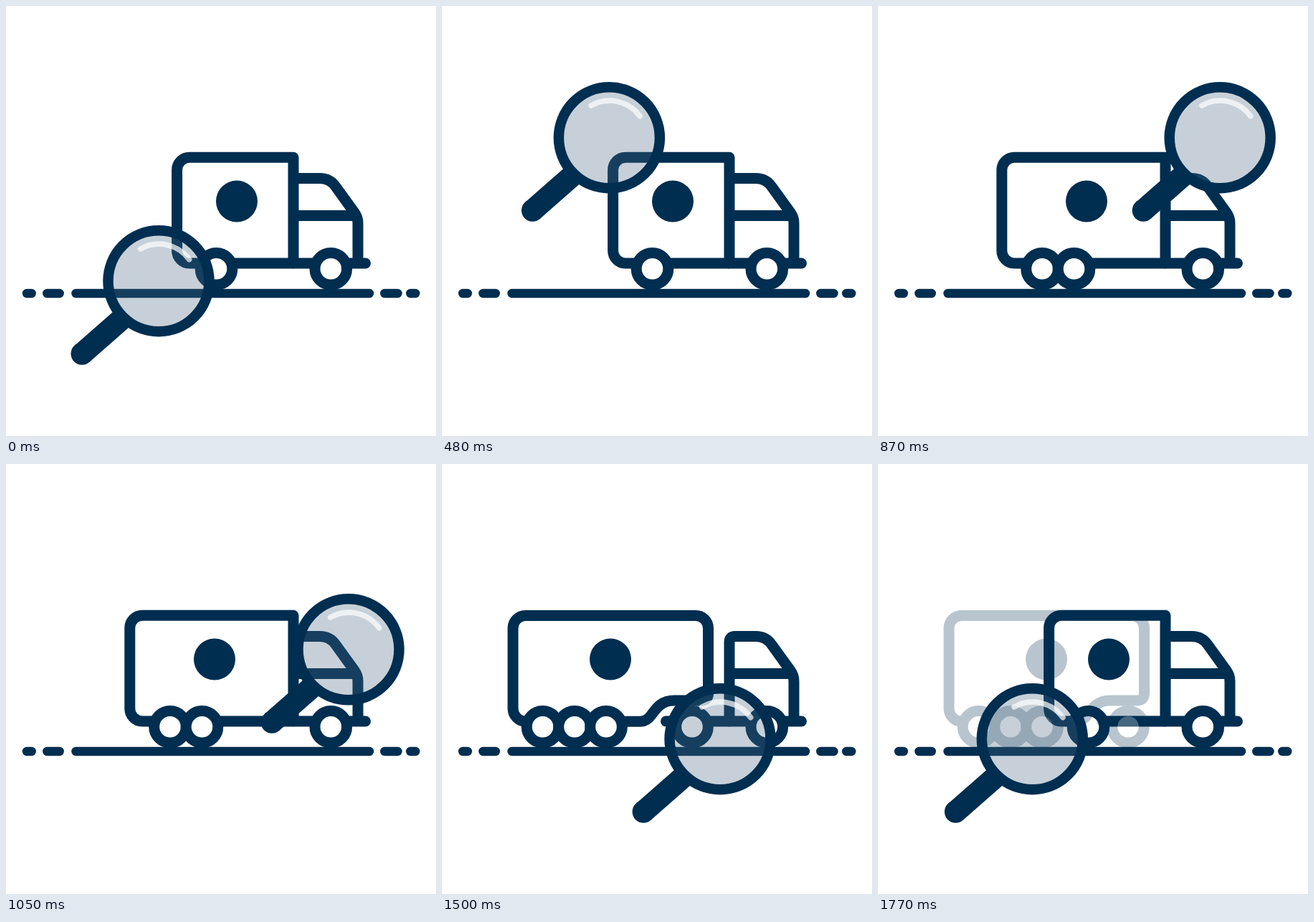
Recreate the animation shown at these times as an HTML page. Size 600x600 px, loop 1800 ms.

```html
<!DOCTYPE html>
<html lang="en">
<head>
<meta charset="utf-8">
<title>Truck search</title>
<style>
  html, body { margin: 0; width: 100%; height: 100%; overflow: hidden; background: #fff; }
  svg { display: block; width: 100%; height: 100%; }
  .line { fill: none; stroke: #002e50; stroke-width: 15; stroke-linejoin: round; }
  .round { stroke-linecap: round; }
  .wheel { fill: #fff; stroke: #002e50; stroke-width: 15; }
  .solid { fill: #002e50; }
</style>
</head>
<body>
<svg viewBox="0 0 600 600">
  <path class="line round" style="stroke-width:12.5"
    d="M29 401H35.7M57.3 401H74.7M97.5 401H507M528.3 401H546.5M564.3 401H571.3"/>

  <g id="trucks"></g>

  <g id="cab">
    <path class="line" d="M408 240.5H438Q452 240.5 460 252L486 288Q491 295 491 303V359M405 292.5H489"/>
    <path class="line round" d="M401 359H501.5"/>
    <circle class="wheel" cx="453.3" cy="366.8" r="22.3"/>
  </g>

  <g id="lens">
    <path class="line" style="stroke-width:31" d="M-107 101.5L-50 51.5"/>
    <circle class="solid" cx="-107" cy="101.5" r="15.5"/>
    <circle r="70.5" fill="rgb(72,103,127)" fill-opacity=".305"/>
    <circle class="line" style="stroke-width:14.5" r="70.5"/>
    <path d="M-25.3 -44.8A52 52 0 0 1 42.7 -30" fill="none" stroke="#fff" stroke-opacity=".7"
      stroke-width="7.5" stroke-linecap="round"/>
  </g>
</svg>
<script>
const LOOP = 1800, STEP = 30, TRUCK_TIME = 600;

const boxPath = left =>
  `M401 366V211.3H${left + 17.5}a17.5 17.5 0 0 0 -17.5 17.5V341.5a17.5 17.5 0 0 0 17.5 17.5H401`;

const trucks = [
  { body: boxPath(238.6), wheels: [293.5], badge: 322 },
  { body: boxPath(172.8), wheels: [229, 273.5], badge: 291 },
  {
    body: 'M117 359.3a18 18 0 0 1 -18 -18V229a17.5 17.5 0 0 1 17.5 -17.5H354a17.5 17.5 0 0 1 17.5 17.5' +
      'V320Q371.5 330 361.5 330H324C306 330 299 341 293 349Q286 359.3 277 359.3Z' +
      'M401 359V248.5Q401 240.5 409 240.5H410',
    chassis: 'M312.5 359H401',
    wheels: [140.5, 185, 229, 349],
    badge: 235
  }
];

const wheel = x => `<circle class="wheel" cx="${x}" cy="366.8" r="22.3"/>`;

const truckMarkup = ({ body, chassis = '', wheels, badge }) => `<g>
  <path class="line" d="${body}"/>
  <path class="line round" d="${chassis}"/>
  ${wheels.map(wheel).join('')}
  <circle class="solid" cx="${badge}" cy="272.5" r="29"/>
</g>`;

const truckLayer = document.getElementById('trucks');
truckLayer.innerHTML = trucks.map(truckMarkup).join('');
const lens = document.getElementById('lens');

const clamp = v => Math.min(1, Math.max(0, v));
const ease = u => u < 0.5 ? 2 * u * u : 1 - 2 * (1 - u) ** 2;
const leg = (t, start, end) => ease(clamp((t - start) / (end - start)));

// The next truck fades in slightly ahead of the old one fading out.
function truckOpacity(t, index) {
  const age = (t - index * TRUCK_TIME + 120 + LOOP) % LOOP;
  return clamp(age / 90) * clamp((720 - age) / 110);
}

function render(time) {
  const t = Math.floor(time % LOOP / STEP) * STEP;
  const x = 213 + 265 * (leg(t, 380, 890) - leg(t, 1287, 1804));
  const y = 383.8 - 200 * (leg(t, 0, 378) - leg(t, 888, 1262));
  lens.setAttribute('transform', `translate(${x} ${y})`);
  [...truckLayer.children].forEach((truck, i) => truck.setAttribute('opacity', truckOpacity(t, i)));
}

let origin;
function tick(now) {
  origin ??= now;
  render(now - origin);
  requestAnimationFrame(tick);
}
render(0);
requestAnimationFrame(tick);
</script>
</body>
</html>
```
